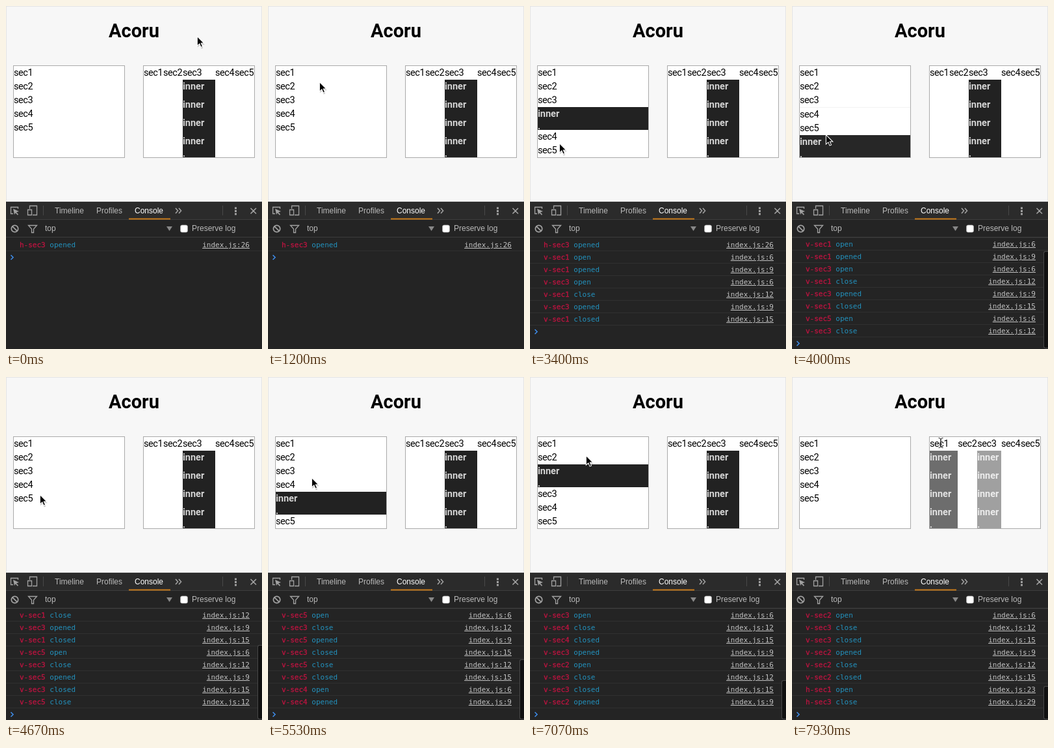
An HTML page for the animation above (8000 ms loop, 394 by 526 pixels).

```html
<!DOCTYPE html>
<html lang="en">
<head>
<meta charset="utf-8">
<title>Acoru</title>
<style>
html, body { margin: 0; width: 100%; height: 100%; overflow: hidden; }
#stage { position: relative; width: 394px; height: 526px; overflow: hidden; background: #f7f7f7; cursor: default; }
#stage > * { position: absolute; }
#edge { left: 0; top: 0; width: 394px; height: 301px; box-shadow: inset 0 0 0 1px #e4e4e4; }
h1 { margin: 0; left: 0; top: 18px; width: 394px; text-align: center; font: 700 29px/40px Roboto, sans-serif; color: #000; }
.box { box-sizing: border-box; top: 91px; width: 172px; height: 142px; border: 1px solid #aaa; background: #fff; overflow: hidden; display: flex; font: 14.5px/21px Roboto, sans-serif; color: #000; }
#v { left: 11px; flex-direction: column; }
#h { left: 211px; }
.sec { flex: none; }
.head { height: 21px; letter-spacing: -.4px; white-space: nowrap; }
.inner { background: #222; color: #d4d4d4; font-weight: 700; overflow: hidden; }
.inner div { height: 28px; }
#h .inner { height: 119px; }
#tools { left: 0; top: 300px; width: 394px; height: 226px; background: #242424; }
#bars { left: 0; top: 300px; }
#bars text { font: 12px "Liberation Sans", Arial, sans-serif; fill: #bababa; }
#log { left: 0; top: 355px; width: 394px; height: 171px; overflow: hidden; font: 11px/20px "DejaVu Sans Mono", monospace; }
#rows { position: absolute; top: 2px; width: 394px; }
.row { box-sizing: border-box; position: relative; height: 19px; padding-left: 21px; border-bottom: 1px solid #303030; color: #2391bd; white-space: pre; }
.row b { font-weight: 400; color: #bd1440; -webkit-text-stroke: .3px; }
.row u { position: absolute; right: 19px; color: #c2c2c2; }
#prompt { position: absolute; left: 6px; }
#thumb { position: absolute; left: 387px; bottom: 1px; box-sizing: border-box; width: 7px; border: 1px solid #484848; border-right: 0; border-radius: 3px 0 0 3px; background: #111; }
#pointer { left: 0; top: 0; overflow: visible; }
</style>
</head>
<body>
<div id="stage">
  <div id="edge"></div>
  <h1>Acoru</h1>
  <div id="v" class="box"></div>
  <div id="h" class="box"></div>
  <div id="tools"></div>
  <svg id="bars" width="394" height="55" fill="none" stroke="#a2a2a2" stroke-width="1.3">
    <path d="M0 0H394V27.5H0Z" fill="#2b2b2b" stroke="none"/>
    <path d="M0 .5H394M0 27.5H394M0 54.5H394" stroke="#3d3d3d" stroke-width="1"/>
    <path d="M57.5 6V21M333.5 6V21" stroke="#484848" stroke-width="1"/>
    <path d="M189 26.5H253" stroke="#c57a1c" stroke-width="2"/>
    <path d="M11 18.5H7.5V8.5H18.5V11"/>
    <path d="M11 11L20 15L16 16.2L19 19.5L17.8 20.7L14.7 17.3L13 20Z" fill="#a2a2a2" stroke="none"/>
    <path d="M36.5 11V6.5H47.5V20.5H41M33.5 12.5H39.5V20.5H33.5Z"/>
    <path d="M261 10L264.5 14L261 18M266 10L269.5 14L266 18M376.5 10L385 18.5M385 10L376.5 18.5" stroke-width="1.6"/>
    <path d="M352 8.5h3v3h-3zM352 13h3v3h-3zM352 17.5h3v3h-3z" fill="#a2a2a2" stroke="none"/>
    <circle cx="13.5" cy="41.5" r="5.2" stroke-width="1.7"/>
    <path d="M9.8 37.8L17.2 45.2" stroke-width="1.7"/>
    <path d="M34.5 36.5H47.5L42.5 42V47.5H39.5V42Z"/>
    <path d="M247 38H256L251.5 45Z" fill="#888" stroke="none"/>
    <rect x="268.5" y="36" width="11" height="11" rx="2.5" fill="#fff" stroke="#aaa" stroke-width=".7"/>
    <g stroke="none">
      <text x="75" y="18">Timeline</text>
      <text x="139" y="18">Profiles</text>
      <text x="198" y="18" style="fill:#fff">Console</text>
      <text x="60" y="45">top</text>
      <text x="286" y="45">Preserve log</text>
    </g>
  </svg>
  <div id="log">
    <div id="rows"></div>
    <svg id="prompt" width="8" height="10"><path d="M1.5 1L5 4.5L1.5 8" fill="none" stroke="#3f8ce8" stroke-width="1.6"/></svg>
    <div id="thumb"></div>
  </div>
  <svg id="pointer" width="1" height="1">
    <g id="arrow" transform="translate(-1.2 0) scale(1.05)">
      <path d="M.5 1V15L3.8 12L6 17L8.5 16L6.3 11H11Z" fill="#0003" transform="translate(.5 1.5)"/>
      <path d="M.5 .5V14.3L3.8 11.3L6 16.3L8.3 15.3L6.2 10.5H10.5Z" fill="#000" stroke="#fff"/>
    </g>
    <g id="beam" fill="none">
      <path d="M-3.5 -7.5Q0 -7.5 0 -5V5Q0 7.5 -3.5 7.5M3.5 -7.5Q0 -7.5 0 -5V5Q0 7.5 3.5 7.5M-2 2H2" stroke="#fff9" stroke-width="2.5"/>
      <path d="M-3.5 -7.5Q0 -7.5 0 -5V5Q0 7.5 -3.5 7.5M3.5 -7.5Q0 -7.5 0 -5V5Q0 7.5 3.5 7.5M-2 2H2" stroke="#222"/>
    </g>
  </svg>
</div>
<script>
const LOOP = 8000, SLIDE = 400;
const $ = id => document.getElementById(id);

// time, axis, section opened, section closed, whether the closing one reports first
const clicks = [
  [2030, 'v', 1, 0], [2710, 'v', 3, 1], [3640, 'v', 5, 3], [4260, 'v', 0, 5],
  [5000, 'v', 4, 0], [5830, 'v', 3, 4, true], [6510, 'v', 2, 3, true],
  [7130, 'v', 0, 2], [7690, 'h', 1, 3]
];

// time, x, y
const path = [
  [0, 295, 46], [150, 295, 46], [900, 95, 111], [1200, 80, 116], [1850, 36, 104],
  [2200, 36, 105], [2600, 42, 179], [2850, 42, 179], [3400, 46, 210], [3600, 52, 219],
  [3750, 52, 219], [4200, 53, 181], [4670, 53, 180], [4950, 59, 164], [5300, 62, 163],
  [5780, 74, 143], [6000, 75, 142], [6400, 87, 121], [7150, 87, 120], [7620, 229, 101], [LOOP, 229, 101]
];

const lines = { v: { open: 6, opened: 9, close: 12, closed: 15 }, h: { open: 23, opened: 26, close: 29, closed: 32 } };
const logs = [[0, 'h', 3, 'opened']];
for (const [t, axis, opening, closing, closedFirst] of clicks) {
  const end = t + SLIDE + 20;
  const add = (time, sec, verb) => sec && logs.push([time, axis, sec, verb]);
  add(t, opening, 'open');
  add(t, closing, 'close');
  if (closedFirst) add(end, closing, 'closed');
  add(end, opening, 'opened');
  if (!closedFirst) add(end, closing, 'closed');
}

const clamp = x => Math.min(1, Math.max(0, x));
const swing = x => (1 - Math.cos(Math.PI * clamp(x))) / 2;

for (const axis of 'vh') {
  const inner = '<div>inner</div>'.repeat(5);
  for (let i = 1; i <= 5; i++)
    $(axis).innerHTML += `<div class="sec"><div class="head">sec${i}</div><div class="inner">${inner}</div></div>`;
}
$('rows').innerHTML = logs.map(([, axis, sec, verb]) =>
  `<div class="row"><b>${axis}-sec${sec}</b> ${verb}<u>index.js:${lines[axis][verb]}</u></div>`).join('');

function openness(t, axis, sec) {
  let size = axis === 'h' && sec === 3 ? 1 : 0, alpha = size;
  for (const [start, a, opening, closing] of clicks) {
    if (a !== axis || t < start) continue;
    const p = swing((t - start) / SLIDE);
    if (sec === opening) size = alpha = p;
    if (sec === closing) { size = 1 - p; alpha = size ** .8; }
  }
  return [size, alpha];
}

function drawSections(t) {
  for (const axis of 'vh') {
    [...$(axis).children].forEach((el, i) => {
      const [size, alpha] = openness(t, axis, i + 1);
      const inner = el.lastChild;
      if (axis === 'v') inner.style.height = 35 * size + 'px';
      else el.style.width = 30 + 20 * size + 'px';
      inner.style.opacity = alpha;
      inner.style.display = size > .001 ? '' : 'none';
    });
  }
}

function drawLog(t) {
  const n = logs.filter(([time]) => time <= t).length;
  const scroll = Math.max(0, (n - 8) * 19 + 1);
  [...$('rows').children].forEach((row, i) => row.style.display = i < n ? '' : 'none');
  $('rows').style.transform = `translateY(${-scroll}px)`;
  $('prompt').style.top = 7 + n * 19 - scroll + 'px';
  $('thumb').style.height = 171 * 171 / (171 + scroll) - 4 + 'px';
  $('thumb').style.display = scroll ? '' : 'none';
}

function overText(x, y) {
  if (x > 212 && x < 243) return y > 92 && y < 113;
  if (x < 12 || x > 43) return false;
  return [...$('v').children].some(el => {
    const top = 92 + el.offsetTop - $('v').firstChild.offsetTop;
    return y >= top && y < top + 21;
  });
}

function drawPointer(t) {
  const i = Math.max(1, path.findIndex(([time]) => time >= t));
  const [t0, x0, y0] = path[i - 1], [t1, x1, y1] = path[i];
  const p = swing((t - t0) / (t1 - t0));
  const x = x0 + (x1 - x0) * p, y = y0 + (y1 - y0) * p;
  const text = overText(x, y);
  $('arrow').style.display = text ? 'none' : '';
  $('beam').style.display = text ? '' : 'none';
  $('pointer').style.transform = `translate(${Math.round(x)}px, ${Math.round(y)}px)`;
}

const begin = performance.now();
function frame() {
  const t = (performance.now() - begin) % LOOP;
  drawSections(t);
  drawLog(t);
  drawPointer(t);
  requestAnimationFrame(frame);
}
frame();
</script>
</body>
</html>
```
